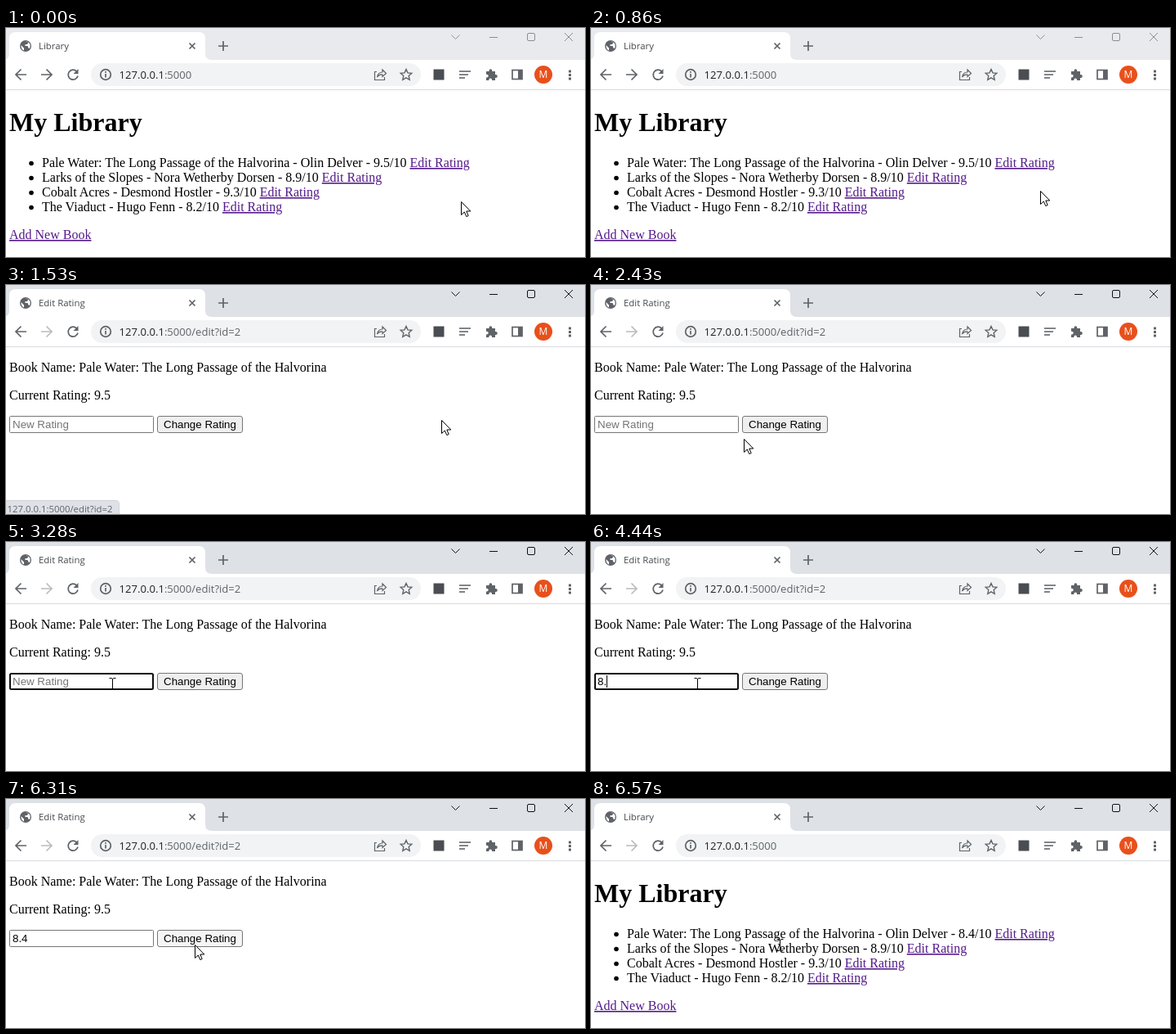
These frames come from a looping animation (709x280 px, 8 s). An HTML page:

```html
<!DOCTYPE html>
<html lang="en">
<head>
<meta charset="utf-8">
<title>Library</title>
<style>
html, body { margin: 0; width: 100%; height: 100%; overflow: hidden; background: #fff; }
svg { display: block; }
text { white-space: pre; }
.page { font: 16px "Liberation Serif", "Times New Roman", serif; }
.form { font: 13.33px "Liberation Sans", Arial, sans-serif; }
.ui { font-family: "Open Sans", "Noto Sans", sans-serif; }
.link { fill: #551a8b; text-decoration: underline; }
.line { fill: none; stroke: #5f6368; stroke-width: 1.7; }
.thin { fill: none; stroke-width: 1; }
</style>
</head>
<body>
<svg width="709" height="280" viewBox="0 0 709 280">
  <rect width="709" height="280" fill="#fff"/>
  <rect id="frame" width="709" height="39"/>

  <!-- tab strip -->
  <g class="ui">
    <path d="M-4 39Q4 39 4 31V13Q4 5 12 5H236Q244 5 244 13V31Q244 39 252 39Z" fill="#fff"/>
    <circle cx="24" cy="22" r="7" fill="#5f6368"/>
    <path d="M18.5 21L22 24.500V27.500Q18.200 26 18.500 21ZM24 16.500L27.500 17.500 26 20H23.500V22H26.500L27.500 24.500 29 25Q30.500 21 28.500 18.500L26.500 16.800Z" fill="#fff"/>
    <text id="title" x="40" y="26" font-size="11.4" fill="#45494d"></text>
    <path class="line" stroke-width="1.5" d="M224.500 18.500l7 7m0-7l-7 7M260 22h12M266 16v12"/>
    <path id="controls" class="thin" d="M545.500 8.500l5 5 5-5M592 11.500h10M640 6.500h6q1.500 0 1.500 1.500v6q0 1.500-1.500 1.500h-6q-1.500 0-1.500-1.500v-6q0-1.500 1.500-1.500ZM684 6l10 10m0-10l-10 10"/>
  </g>

  <!-- toolbar -->
  <g class="ui">
    <path d="M0 75.500H709" stroke="#dadce0"/>
    <rect x="104" y="43" width="404" height="28" rx="14" fill="#f1f3f4"/>
    <path class="line" d="M25 57H12.500M18.500 50.500L12 57l6.500 6.500"/>
    <path id="forward" class="line" d="M43 57h12.500M49.500 50.500L56 57l-6.500 6.500"/>
    <path class="line" d="M86.500 53A6 6 0 1 0 88 58.500"/>
    <path d="M88.500 50v6h-6Z" fill="#5f6368"/>
    <circle class="line" cx="122" cy="57" r="6.300" stroke-width="1.300"/>
    <path class="line" d="M122 56v4.500M122 53v1.700"/>
    <text x="138.500" y="62" font-size="13.1" fill="#202124">127.0.0.1<tspan id="path" fill="#5f6368"></tspan></text>
    <path class="line" style="stroke-width:1.2" d="M454 53.500H451.500V63.500H463.500V60M454.500 60Q455.500 54 461 54V51L465.500 55.500 461 59.500V57Q457 56.500 454.500 60Z"/>
    <path class="line" style="stroke-width:1.4" d="M490 50.500l2 4.400 4.800.5-3.600 3.200 1 4.700-4.200-2.400-4.200 2.400 1-4.700-3.600-3.200 4.800-.5Z"/>
    <rect x="523.500" y="50.500" width="13" height="13" fill="#4a4d51"/>
    <path stroke="#80858a" stroke-width="2" d="M555 53h14M555 57h11M555 61h7"/>
    <path d="M588 53h3.500v-.8a1.900 1.900 0 0 1 3.800 0v.8H599v4h.8a2 2 0 0 1 0 4H599v3h-4v-.8a1.800 1.800 0 0 0-3.600 0v.8H588v-3.500h.8a1.900 1.900 0 0 0 0-3.800H588Z" fill="#5f6368"/>
    <rect class="line" x="620" y="51.500" width="12" height="11"/>
    <path d="M627 51h5v12h-5Z" fill="#5f6368"/>
    <circle cx="658" cy="57" r="11" fill="#e8501b"/>
    <text x="658" y="61.300" font-size="12" text-anchor="middle" fill="#fff">M</text>
    <path d="M689 51.500h3v3h-3ZM689 56h3v3h-3ZM689 60.500h3v3h-3Z" fill="#5f6368"/>
  </g>

  <g id="library" class="page">
    <text x="4" y="126" font-size="32" font-weight="bold">My Library</text>
    <g id="books"></g>
    <text class="link" x="4" y="258">Add New Book</text>
  </g>

  <g id="edit" class="page">
    <text id="name" x="4" y="106"></text>
    <text x="4" y="140">Current Rating: 9.5</text>
    <g class="form">
      <rect id="field" fill="#fff"/>
      <text id="value" x="8" y="175"></text>
      <path id="caret" d="M8.500 163v15" stroke="#000"/>
      <rect id="button" x="185.500" y="160.500" width="104" height="20" rx="2.500" stroke="#767676"/>
      <text x="193" y="175">Change Rating</text>
    </g>
  </g>

  <g id="status" class="ui">
    <path id="bubble" d="M-1 281V263.500H134Q138.500 263.500 138.500 268V281Z" stroke="#d0d3d8"/>
    <text x="1.500" y="277.500" font-size="11.35" fill="#5f6368">127.0.0.1:5000/edit?id=2</text>
  </g>

  <g id="cursor" stroke="#000" fill="#fff" stroke-linejoin="round">
    <path id="arrow" d="M.5.5V16.500L4.300 13 6.800 18.600 9.200 17.500 6.800 12H11.800Z"/>
    <path id="hand" d="M-2 13V2A2 2 0 0 1 2 2V8Q4 7 5 9 7 8 8 10 10.500 9.500 10.500 12V16Q10.500 19 8.500 22H-.5L-6 14Q-7.500 11.500-5.500 11-4 11-2 13ZM2 8v4M5 9v3.500M8 10v3"/>
    <path id="beam" fill="none" d="M-3.500-6.500H-1L.5-5.500 2-6.500H4.500M.5-5.500V6.500M-3.500 7.500H-1L.5 6.500 2 7.500H4.500"/>
  </g>
</svg>
<script>
const $ = id => document.getElementById(id);
const set = (id, attrs) => { for (const k in attrs) $(id).setAttribute(k, attrs[k]); };
const show = (id, on) => set(id, { visibility: on ? "visible" : "hidden" });
const write = (id, s) => { if ($(id).textContent !== s) $(id).textContent = s; };
const clamp = v => Math.max(0, Math.min(1, v));
const within = (t, a, b) => t >= a && t < b;

const books = [
  ["Pale Water: The Long Passage of the Halvorina", "Olin Delver", "9.5"],
  ["Larks of the Slopes", "Nora Wetherby Dorsen", "8.9"],
  ["Cobalt Acres", "Desmond Hostler", "9.3"],
  ["The Viaduct", "Hugo Fenn", "8.2"]
];
$("books").innerHTML = books.map(([name, author, rating], i) => {
  const y = 170 + 18 * i;
  return `<circle cx="31" cy="${y - 4.5}" r="2.8"/><text x="44" y="${y}">${name} - ${author} - ` +
    `<tspan id="rating${i}">${rating}</tspan>/10 <tspan class="link">Edit Rating</tspan></text>`;
}).join("");
$("name").textContent = "Book Name: " + books[0][0];

// pointer stops: time, x, y
const stops = [
  [650, 557, 212], [1250, 533, 165], [2070, 533, 165], [2430, 187, 188],
  [2720, 130, 173], [5700, 130, 173], [6160, 231, 178]
];
function pointer(t) {
  let [, x, y] = stops[0];
  for (let i = 1; i < stops.length; i++) {
    const [t0, x0, y0] = stops[i - 1], [t1, x1, y1] = stops[i];
    if (t < t0) break;
    const p = clamp((t - t0) / (t1 - t0)), e = p * p * (3 - 2 * p);
    x = x0 + (x1 - x0) * e;
    y = y0 + (y1 - y0) * e;
  }
  return [Math.round(x), Math.round(y)];
}

function draw(t) {
  const editing = within(t, 1530, 6410);
  const active = t >= 1420;
  const focus = within(t, 2780, 6310);
  const value = t < 4140 ? "" : t < 4440 ? "8" : t < 5000 ? "8." : "8.4";
  const [x, y] = pointer(t);
  const tint = active ? "#dee1e6" : "#e8eaed";

  set("frame", { fill: tint });
  set("bubble", { fill: tint });
  set("controls", { stroke: active ? "#111" : "#8b8d90" });
  $("forward").style.stroke = t < 1530 ? "#5f6368" : "#babcbe";
  write("title", editing ? "Edit Rating" : "Library");
  write("path", editing ? ":5000/edit?id=2" : ":5000");
  write("rating0", t < 6410 ? "9.5" : "8.4");
  $("library").style.display = editing ? "none" : "";
  $("edit").style.display = editing ? "" : "none";
  set("status", { opacity: clamp((t - 1110) / 150) * clamp((2000 - t) / 200) });

  set("field", focus
    ? { x: 5, y: 161, width: 175, height: 19, rx: 1.5, stroke: "#101010", "stroke-width": 2 }
    : { x: 4.5, y: 160.5, width: 176, height: 20, rx: 1, stroke: "#767676", "stroke-width": 1 });
  write("value", value || "New Rating");
  set("value", { fill: value ? "#000" : "#757575" });
  const caretOn = within(t, 2780, 3280) || within(t, 3780, 5550) || within(t, 6050, 6310);
  $("caret").style.display = caretOn ? "" : "none";
  set("caret", { transform: `translate(${[0, 7, 11, 18][value.length]} 0)` });
  const overButton = editing && within(x, 185, 290) && within(y, 160, 181);
  set("button", { fill: !overButton ? "#efefef" : t < 6310 ? "#e5e5e5" : "#f5f5f5" });

  const hand = !editing && t < 1530 && y < 174 && y >= 156;
  const beam = t >= 6570 || editing && within(x, 4, 181) && within(y, 160, 181);
  show("hand", hand);
  show("beam", beam);
  show("arrow", !hand && !beam);
  set("cursor", { transform: `translate(${x} ${y})` });
}

const start = performance.now();
function tick() {
  draw((performance.now() - start) % 8000);
  requestAnimationFrame(tick);
}
tick();
</script>
</body>
</html>
```
